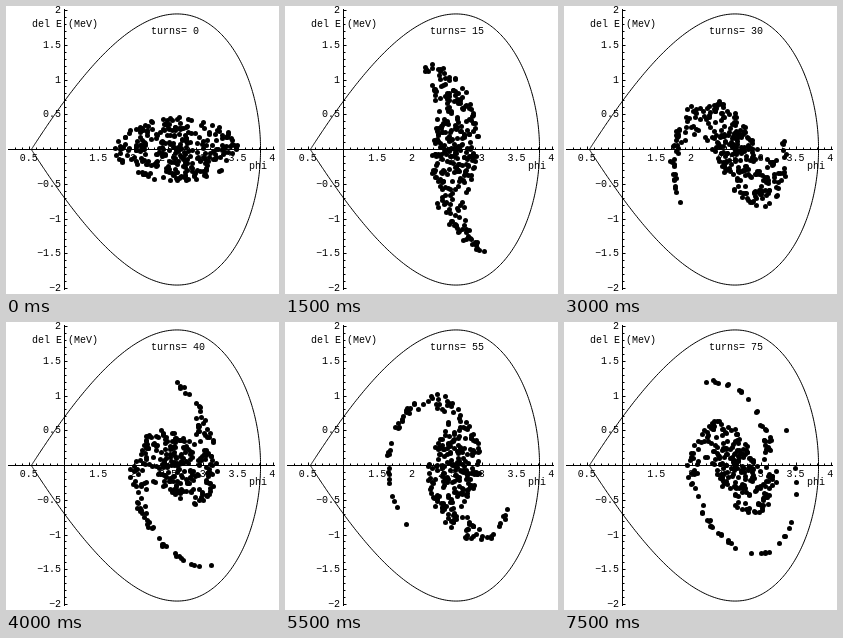
Write an HTML page with a canvas that moves like this. It is 273 px wide and 288 px high and loops after 8 s.

```html
<!DOCTYPE html>
<html>
<head>
<meta charset="utf-8">
<style>
html, body { margin: 0; width: 273px; height: 288px; overflow: hidden; background: #fff; }
canvas { display: block; }
</style>
</head>
<body>
<canvas id="stage" width="273" height="288"></canvas>
<script>
const ctx = document.getElementById('stage').getContext('2d');
const SX = 69.6, SY = 69.5, X0 = 58.5, Y0 = 143.5;
const KICK = 1, DRIFT = 0.36;
const STABLE = 5 * Math.PI / 6;
const px = phi => X0 + SX * (phi - 1);
const py = e => Y0 - SY * e;
const snap = v => Math.floor(v) + 0.5;

let seed = 11;
function rand() {
  seed = (seed * 16807) % 2147483647;
  return seed / 2147483647;
}

// Elliptical bunch around the stable phase, denser at its centre
const bunch = Array.from({ length: 290 }, () => {
  const r = rand() ** 0.6, a = rand() * 2 * Math.PI;
  return [STABLE + 0.89 * r * Math.cos(a), 0.46 * r * Math.sin(a)];
});

function track([phi, e], turns) {
  for (let i = 0; i < turns; i++) {
    phi += DRIFT * e;
    e += KICK * (Math.sin(phi) - 0.5);
  }
  return [phi, e];
}

function line(x1, y1, x2, y2) {
  ctx.moveTo(x1, y1);
  ctx.lineTo(x2, y2);
}

function text(s, x, y, align = 'left') {
  ctx.textAlign = align;
  ctx.fillText(String(s).replace('-', '\u2212'), x, y);
}

function drawAxes() {
  ctx.beginPath();
  line(2, Y0, 269, Y0);
  line(X0, 3, X0, 284);
  for (let i = 3; i <= 40; i++) {
    const x = snap(px(i / 10));
    line(x, Y0, x, Y0 - (i % 5 ? 2 : 3));
  }
  for (let i = -20; i <= 20; i++) {
    const y = snap(py(i / 10));
    line(X0, y, X0 + (i % 5 ? 2 : 3), y);
  }
  ctx.stroke();
  for (let v = 0.5; v <= 4; v += 0.5) if (v !== 1) text(v, px(v) - 1, 155, 'center');
  for (let v = -2; v <= 2; v += 0.5) if (v) text(v, 55, Math.floor(py(v)) + 3, 'right');
  text('del E (MeV)', 26, 21);
  text('phi', 243, 163);
}

function drawSeparatrix() {
  const top = Math.cos(Math.PI / 6) + Math.PI / 12;
  const left = Math.PI / 6, right = 3.8165;
  ctx.beginPath();
  for (const side of [1, -1]) {
    for (let i = 0; i <= 200; i++) {
      // Cosine spacing keeps the steep right end smooth
      const phi = left + (right - left) * (1 - Math.cos(Math.PI * i / 200)) / 2;
      const h = top - Math.cos(phi) - phi / 2;
      const e = i === 200 ? 0 : side * Math.sqrt(Math.max(0, 2 * KICK / DRIFT * h));
      ctx[i ? 'lineTo' : 'moveTo'](px(phi), py(e));
    }
  }
  ctx.stroke();
}

function draw(turns) {
  ctx.fillStyle = '#fff';
  ctx.fillRect(0, 0, 273, 288);
  ctx.fillStyle = ctx.strokeStyle = '#000';
  ctx.lineWidth = 1;
  ctx.font = '10px "Liberation Mono", Courier, monospace';
  drawAxes();
  drawSeparatrix();
  text('turns= ' + turns, 145, 28);
  for (const p of bunch) {
    const [phi, e] = track(p, turns);
    ctx.beginPath();
    ctx.arc(snap(px(phi)), snap(py(e)), 2.5, 0, 2 * Math.PI);
    ctx.fill();
  }
}

const start = performance.now();
let shown = -1;
function tick() {
  const turns = 5 * (Math.floor((performance.now() - start) / 500) % 16);
  if (turns !== shown) draw(shown = turns);
  requestAnimationFrame(tick);
}
tick();
</script>
</body>
</html>
```
